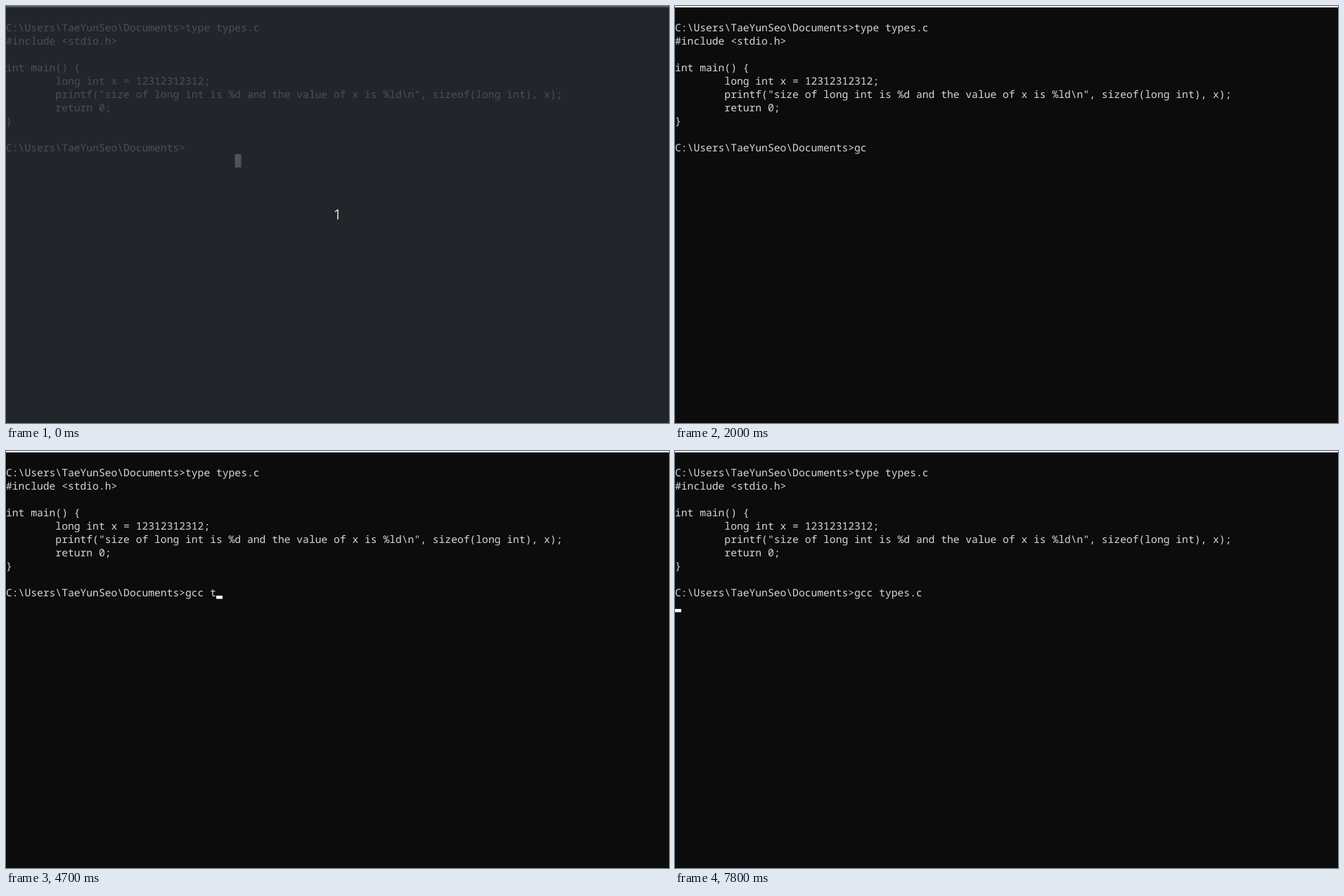
An HTML page for the animation above (8 s loop, 943x594 px).

```html
<!DOCTYPE html>
<html lang="en">
<head>
<meta charset="utf-8">
<title>Terminal</title>
<style>
  html, body { margin: 0; width: 100%; height: 100%; overflow: hidden; background: #0c0c0c; }
  svg { display: block; }
  text { white-space: pre; text-rendering: geometricPrecision; }
  #screen text { font: 500 14.662px "Noto Sans Mono", "DejaVu Sans Mono", monospace; fill: #d8d8d8; }
  #count text { font: 20px "Open Sans", "Noto Sans", sans-serif; fill: #e6e6e6; text-anchor: middle; }
</style>
</head>
<body>
<svg width="943" height="594" viewBox="0 0 943 594">
  <rect width="943" height="594" fill="#0c0c0c"/>
  <rect width="943" height="2" fill="#fff"/>
  <g id="screen"></g>
  <rect id="pointer" x="325.5" y="211" width="9" height="19" fill="#f2f2f2"/>
  <rect id="cursor" width="8.797" height="4.6" fill="#fff"/>
  <g id="count">
    <rect width="943" height="594" fill="#282c31" fill-opacity=".8"/>
    <text x="471.5" y="304">1</text>
  </g>
</svg>
<script>
const LOOP = 8000, CHAR = 8.797, ROW = 19, BASE = 36;
const PROMPT = 'C:\\Users\\TaeYunSeo\\Documents>';
const LINES = [
  PROMPT + 'type types.c',
  '#include <stdio.h>',
  '',
  'int main() {',
  '        long int x = 12312312312;',
  '        printf("size of long int is %d and the value of x is %ld\\n", sizeof(long int), x);',
  '        return 0;',
  '}',
  '',
  PROMPT
];

// [time, typed command, cursor: 0 hidden, 1 after the command, 2 on the next row]
const STEPS = [
  [0, '', 0], [400, '', 1], [1000, '', 0],
  [1300, 'g', 1], [2000, 'gc', 0], [2100, 'gcc', 1], [2600, 'gcc', 0],
  [2800, 'gcc ', 1], [3100, 'gcc ', 0], [3600, 'gcc ', 1], [4200, 'gcc ', 0],
  [4700, 'gcc t', 1], [4800, 'gcc ty', 1], [5100, 'gcc type', 1],
  [5200, 'gcc types', 1], [5400, 'gcc types.', 1], [5600, 'gcc types.c', 1],
  [5800, 'gcc types.c', 0], [5900, 'gcc types.c', 2], [6300, 'gcc types.c', 0],
  [6800, 'gcc types.c', 2], [7300, 'gcc types.c', 0], [7800, 'gcc types.c', 2]
];

const get = id => document.getElementById(id);
const screen = get('screen'), pointer = get('pointer'), cursor = get('cursor'), count = get('count');
const show = (el, on) => el.setAttribute('visibility', on ? 'visible' : 'hidden');

const rows = LINES.map((line, i) => {
  const el = document.createElementNS('http://www.w3.org/2000/svg', 'text');
  el.setAttribute('y', BASE + i * ROW);
  el.textContent = line;
  screen.appendChild(el);
  return el;
});
const input = rows[rows.length - 1];

function draw(t) {
  const [, typed, mode] = STEPS.filter(s => s[0] <= t).pop();
  const line = PROMPT + typed;
  if (input.textContent !== line) input.textContent = line;
  show(cursor, mode > 0);
  cursor.setAttribute('x', mode === 1 ? line.length * CHAR : 0);
  cursor.setAttribute('y', mode === 2 ? 225 : 206);
  show(pointer, t < 1300);
  show(count, t < 100);
}

const start = performance.now();
function tick() {
  draw((performance.now() - start) % LOOP);
  requestAnimationFrame(tick);
}
draw(0);
requestAnimationFrame(tick);
</script>
</body>
</html>
```
